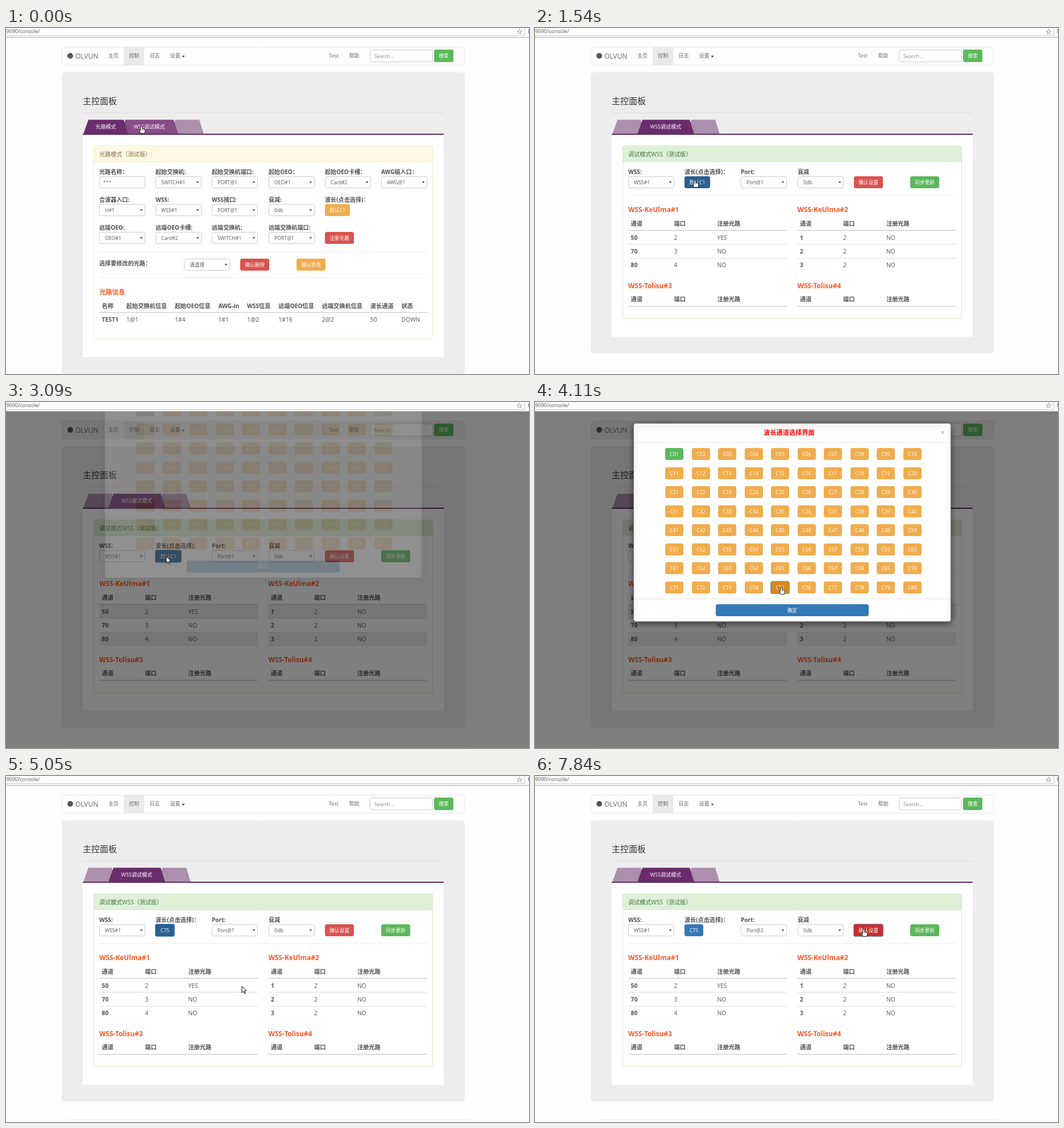
An HTML page with a canvas for the animation above (7.99 s loop, 920x609 px).

```html
<!DOCTYPE html>
<html lang="zh">
<head>
<meta charset="utf-8">
<style>
html, body { margin: 0; overflow: hidden; background: #fff; }
canvas { display: block; }
</style>
</head>
<body>
<canvas id="stage" width="920" height="609"></canvas>
<script>
const W = 920, H = 609, LOOP = 7990, TICK = 130;
const spare = Object.assign(document.createElement('canvas'), { width: W, height: H }).getContext('2d');
const FONT = '"Open Sans","Noto Sans CJK SC","Noto Sans CJK",sans-serif';
const GREEN = '#5cb85c', ORANGE = '#f0ad4e', RED = '#d9534f', BLUE = '#337ab7';
const HOVER = { [GREEN]: '#449d44', [ORANGE]: '#d58a1c', [RED]: '#c9302c', [BLUE]: '#286090' };

// Pointer moves: start, end, x, y. It rests in between.
const MOVES = [[650, 1040, 239, 238], [1040, 1430, 281, 267], [1560, 1820, 174, 372], [1820, 2210, 250, 334],
  [2210, 2600, 282, 272], [3250, 4030, 433, 325], [4160, 4420, 415, 370], [5070, 5460, 437, 268],
  [5850, 6240, 428, 299], [6630, 7150, 578, 269]];

let c = document.getElementById('stage').getContext('2d');
let t = 0, mouse = [0, 0], live = true, hand = false;

const clamp = v => Math.max(0, Math.min(1, v));
const ramp = (start, ms) => clamp((t - start) / ms);
const easeOut = p => 1 - (1 - p) ** 1.9;
const col = i => Math.round(164 + 99.2 * i);
const inside = (x, y, w, h) => mouse[0] >= x && mouse[0] <= x + w && mouse[1] >= y && mouse[1] <= y + h;

function pointerPosition() {
  let x = 238, y = 172;
  for (const [start, end, toX, toY] of MOVES) {
    const p = ramp(start, end - start);
    x += (toX - x) * p;
    y += (toY - y) * p;
  }
  return [Math.round(x), Math.round(y)];
}

// Draws one line centred on y and returns its width.
function text(s, x, y, size = 10.1, color = '#555', heavy = false, align = 'left') {
  c.font = `${heavy ? 'bold ' : ''}${size}px ${FONT}`;
  c.fillStyle = color;
  c.textAlign = align;
  c.fillText(s, x, y + size * 0.36);
  return c.measureText(s).width;
}
const bold = (s, x, y, size, color = '#505050') => text(s, x, y, size, color, true);

function rect(x, y, w, h, color) {
  c.fillStyle = color;
  c.fillRect(x, y, w, h);
}

function box(x, y, w, h, fill, stroke, r = 3) {
  c.beginPath();
  c.roundRect(x + 0.5, y + 0.5, w - 1, h - 1, r);
  c.fillStyle = fill;
  c.fill();
  c.lineWidth = 1;
  c.strokeStyle = stroke;
  c.stroke();
}

function poly(points, fill, stroke) {
  c.beginPath();
  points.forEach(([x, y]) => c.lineTo(x, y));
  c.closePath();
  c.fillStyle = fill;
  c.fill();
  if (stroke) { c.lineWidth = 1; c.strokeStyle = stroke; c.stroke(); }
}

const caret = (x, y, s) => poly([[x - s, y - s / 2], [x + s, y - s / 2], [x, y + s * 0.8]], '#444');

function button(x, y, w, label, color, focus = false, h = 21) {
  const hover = live && inside(x, y, w, h);
  hand ||= hover;
  const fill = hover || (focus && color === BLUE) ? HOVER[color] : color;
  if (focus) box(x - 1, y - 1, w + 2, h + 2, fill, '#6a9fdc');
  box(x, y, w, h, fill, fill, 2.5);
  text(label, x + w / 2, y + h / 2, 8.7, '#fff', false, 'center');
}

function select(x, y, value, label = '', focus = false) {
  bold(label, x, y - 8);
  if (focus) {
    c.shadowColor = 'rgba(102,175,233,.7)';
    c.shadowBlur = 4;
  }
  box(x, y, 81, 21, '#fff', focus ? '#66afe9' : '#ccc');
  c.shadowBlur = 0;
  text(value, x + 10, y + 10.8, 8.7);
  caret(x + 74, y + 10.5, 2.3);
}

// Draws a group off screen, then blends it as one piece.
function layer(alpha, draw, dy = 0) {
  const below = c;
  c = spare;
  c.clearRect(0, 0, W, H);
  draw();
  c = below;
  c.globalAlpha = alpha;
  c.drawImage(spare.canvas, 0, dy);
  c.globalAlpha = 1;
}

function panel(bottom, title, head, border, ink) {
  box(154, 207, 597, bottom - 207, '#fff', border);
  box(154, 207, 597, 29, head, border);
  text(title, 164, 222, 10.1, ink);
}

function lightPathPane() {
  panel(548, '光路模式（测试版）', '#fcf8e3', '#faebcc', '#8a6d3b');
  bold('光路名称：', 164, 253);
  box(164, 261, 81, 21, '#fff', '#ccc');
  text('***', 171, 272, 8.7, '#777');
  const rows = [
    [, '起始交换机:|SWITCH#1', '起始交换机端口:|PORT@1', '起始OEO：|OEO#1', '起始OEO卡槽：|Card#2', 'AWG输入口：|AWG@1'],
    ['合波器入口:|H#1', 'WSS:|WSS#1', 'WSS接口:|PORT@1', '衰减:|0db'],
    ['远端OEO:|OEO#1', '远端OEO卡槽:|Card#2', '远端交换机:|SWITCH#1', '远端交换机端口:|PORT@1']];
  rows.forEach((row, j) => row.forEach((cell, i) => {
    const [label, value] = cell.split('|');
    select(col(i), 261 + 49 * j, value, label);
  }));
  bold('波长(点击选择)：', col(4), 302);
  button(col(4), 310, 44, '默认C1', ORANGE);
  button(col(4), 359, 51, '注册光路', RED);
  rect(164, 393, 577, 1, '#eee');
  bold('选择要修改的光路：', 164, 414);
  select(313, 406, '请选择');
  button(412, 406, 51, '确认删除', RED);
  button(511, 406, 51, '确认修改', ORANGE);
  rect(164, 439, 577, 1, '#eee');
  bold('光路信息', 164, 465, 11.3, '#ff5722');
  const cells = ('名称|TEST1 起始交换机信息|1@1 起始OEO信息|1#4 AWG-in|1#1 WSS信息|1@2 ' +
    '远端OEO信息|1#16 远端交换机信息|2@2 波长通道|50 状态|DOWN').split(' ');
  let x = 168.5;
  cells.forEach((cell, i) => {
    const [head, value] = cell.split('|');
    x += 13.8 + Math.max(bold(head, x, 489, 10.2), text(value, x, 513, 10.4, '#555', i === 0));
  });
  rect(164, 500, 577, 1.5, '#d4d4d4');
}

function table(x, y, title, rows, striped) {
  const cellX = i => x + 4.5 + 76 * i;
  bold(title, x, y, 11.9, '#ff5722');
  ['通道', '端口', '注册光路'].forEach((s, i) => bold(s, cellX(i), y + 24, 10.2));
  rows.forEach((row, j) => {
    const top = y + 37 + j * 24.3;
    if (striped && j % 2 === 0) rect(x, top, 279, 24.3, '#eee');
    if (j) rect(x, Math.round(top) - 1, 279, 1, '#ddd');
    row.split(' ').forEach((s, i) => text(s, cellX(i), top + 12, 10.3, '#555', i === 0));
  });
  rect(x, y + 35.5, 279, 1.5, '#d0d0d0');
}

function debugPane(dimmed) {
  const chosen = t >= 4680;
  panel(512, '调试模式WSS（测试版）', '#dff0d8', '#d6e9c6', '#3c763d');
  select(col(0), 261, 'WSS#1', 'WSS:');
  bold('波长(点击选择)：', col(1), 253);
  button(col(1), 261, chosen ? 33 : 45, chosen ? 'C75' : '默认C1', BLUE, t >= 2850 && t < 5850);
  select(col(2), 261, t < 6630 ? 'Port@1' : 'Port@2', 'Port:', t >= 5850 && t < 7410);
  select(col(3), 261, '0db', '衰减');
  button(col(4), 261, 51, '确认设置', RED, t >= 7410);
  button(col(5), 261, 51, '同步更新', GREEN);
  rect(164, 294, 577, 1, '#eee');
  table(164, 320, 'WSS-KeUlma#1', ['50 2 YES', '70 3 NO', '80 4 NO'], dimmed);
  table(461.5, 320, 'WSS-KeUlma#2', ['1 2 NO', '2 2 NO', '3 2 NO'], dimmed);
  table(164, 453.5, 'WSS-Tolisu#3', []);
  table(461.5, 453.5, 'WSS-Tolisu#4', []);
}

function tabs() {
  const p = ramp(90, 300), second = t > 0;
  const a = 215 - 21 * p, b = 303 - 23 * p;
  const shapes = [
    [136, a, second ? '#ab8fac' : '#6a2c6c', '光路模式', 1 - p],
    [a - 14, b, second ? '#6a2c6c' : '#864c88', 'WSS调试模式', 1],
    [b - 14, b + 45, '#ab8fac', '', 0]];
  for (const i of second ? [2, 0, 1] : [2, 1, 0]) {
    const [l, r, color, label, alpha] = shapes[i];
    poly([[l, 187], [l + 9, 161.5], [r - 8, 161.5], [r, 187]], color);
    c.globalAlpha = alpha;
    text(label, (l + r) / 2, 174, 9.1, '#fff', false, 'center');
    c.globalAlpha = 1;
    hand ||= live && inside(l, 162, r - l, 25);
  }
  rect(135, 186, 635, 2, '#5f2c63');
}

function navbar(dimmed) {
  box(98, 33, 709, 33, dimmed ? '#eee' : '#fefefe', '#e9e9e9');
  rect(207, 34, 36, 31, dimmed ? '#ddd' : '#eaeaea');
  c.beginPath();
  c.arc(113, 49, 5, 0, 7);
  c.fillStyle = '#555';
  c.fill();
  text('OLVUN', 122, 49.5, 12, '#666');
  ['主页', '控制', '日志', '设置'].forEach((s, i) => text(s, 180 + 36.2 * i, 49, 9, '#666'));
  caret(312, 50, 2.6);
  text('Test', 568, 49, 9, '#666');
  text('帮助', 603.5, 49, 9, '#666');
  box(640, 38, 111, 22, '#fff', '#ccc');
  text('Search...', 648, 49.5, 8.8, '#888');
  button(753, 38, 34, '搜索', GREEN, false, 22);
}

function page(dimmed) {
  const first = t < 300, cut = first ? 0 : 35.5;
  rect(0, 0, W, H, '#fefefe');
  navbar(dimmed);
  box(98, 78, 709, 530.5 - cut, '#ededed', '#ededed', 4);
  text('主控面板', 135, 128.5, 15, '#333');
  rect(135, 149, 635, 1, '#dcdcdc');
  rect(135, 188, 635, 391 - cut, '#fff');
  tabs();
  if (first) layer(1 - ramp(100, 150), lightPathPane);
  else {
    layer(ramp(300, 150), () => debugPane(dimmed));
    rect(108, 604, 708, 1, '#eee');
  }
  if (t >= 5850 && t < 6630) portList();
}

function portList() {
  const rowH = 13.75, active = Math.max(0, Math.floor((mouse[1] - 284) / rowH));
  box(362, 283, 81, 112, '#fff', '#8a8a8a', 0);
  for (let i = 0; i < 8; i++) {
    const y = 284 + i * rowH;
    if (i === active) rect(363, y, 79, rowH, '#1e90ff');
    text('Port@' + (i + 1), 372, y + 7, 8.7, i === active ? '#fff' : '#555');
  }
}

function modal() {
  c.shadowColor = 'rgba(0,0,0,.5)';
  c.shadowBlur = 12;
  c.shadowOffsetY = 4;
  box(173, 37, 559, 350, '#fff', '#777', 4);
  c.shadowColor = 'transparent';
  c.shadowBlur = c.shadowOffsetY = 0;
  text('波长通道选择界面', 447, 54, 11.2, '#f00', true, 'center');
  text('×', 717, 53, 13, '#bbb', true, 'center');
  rect(174, 71, 557, 1, '#e5e5e5');
  rect(174, 346, 557, 1, '#e5e5e5');
  const chosen = t < 4290 ? 1 : 75;
  for (let n = 1; n <= 80; n++) {
    const x = 229 + Math.round((n - 1) % 10 * 46.55), y = 81 + Math.round(Math.floor((n - 1) / 10) * 33.55);
    const pressed = n === 75 && t > 4100 && chosen === 1;
    button(x, y, 32, 'C' + String(n).padStart(2, '0'), n === chosen ? GREEN : ORANGE, pressed);
  }
  button(318, 356, 269, '确定', BLUE);
}

function browserBar() {
  rect(0, 0, W, 17, '#fdfdfd');
  rect(0, 13, 913, 1, '#c8c8c8');
  rect(912, 0, 1, 13, '#c8c8c8');
  rect(0, 16, W, 1, '#a8a8a8');
  text(':9090/console/', -2, 6, 9);
  text('☆', 903.5, 6, 10.5, '#444', false, 'center');
  rect(919, 2, 1, 7, '#5a78b8');
}

function pointer() {
  c.save();
  c.translate(...mouse);
  if (hand) {
    box(-3, 5, 10, 9, '#fff', '#111');
    box(-1.5, 0, 4, 9, '#fff', '#111', 1.5);
    rect(-0.5, 5, 2, 6, '#fff');
  } else {
    poly([[0, 0], [0, 11.5], [2.7, 9], [4.6, 13], [6.3, 12.2], [4.5, 8.2], [8, 8]], '#fff', '#111');
  }
  c.restore();
}

function draw(now) {
  t = Math.floor((now % LOOP + 50) / TICK) * TICK;
  mouse = pointerPosition();
  hand = false;
  const shade = 0.5 * Math.min(ramp(2935, 150), 1 - ramp(4870, 150));
  const alpha = Math.min(ramp(3100, 150), 1 - ramp(4720, 150));
  const lift = 87.5 * (1 - easeOut(ramp(3100, 300)) + easeOut(ramp(4720, 300)));
  live = shade === 0;
  page(!live);
  rect(0, 0, W, H, `rgba(0,0,0,${shade})`);
  live = true;
  if (alpha > 0) layer(alpha, modal, -Math.round(lift));
  browserBar();
  pointer();
  requestAnimationFrame(draw);
}
requestAnimationFrame(draw);
</script>
</body>
</html>
```
